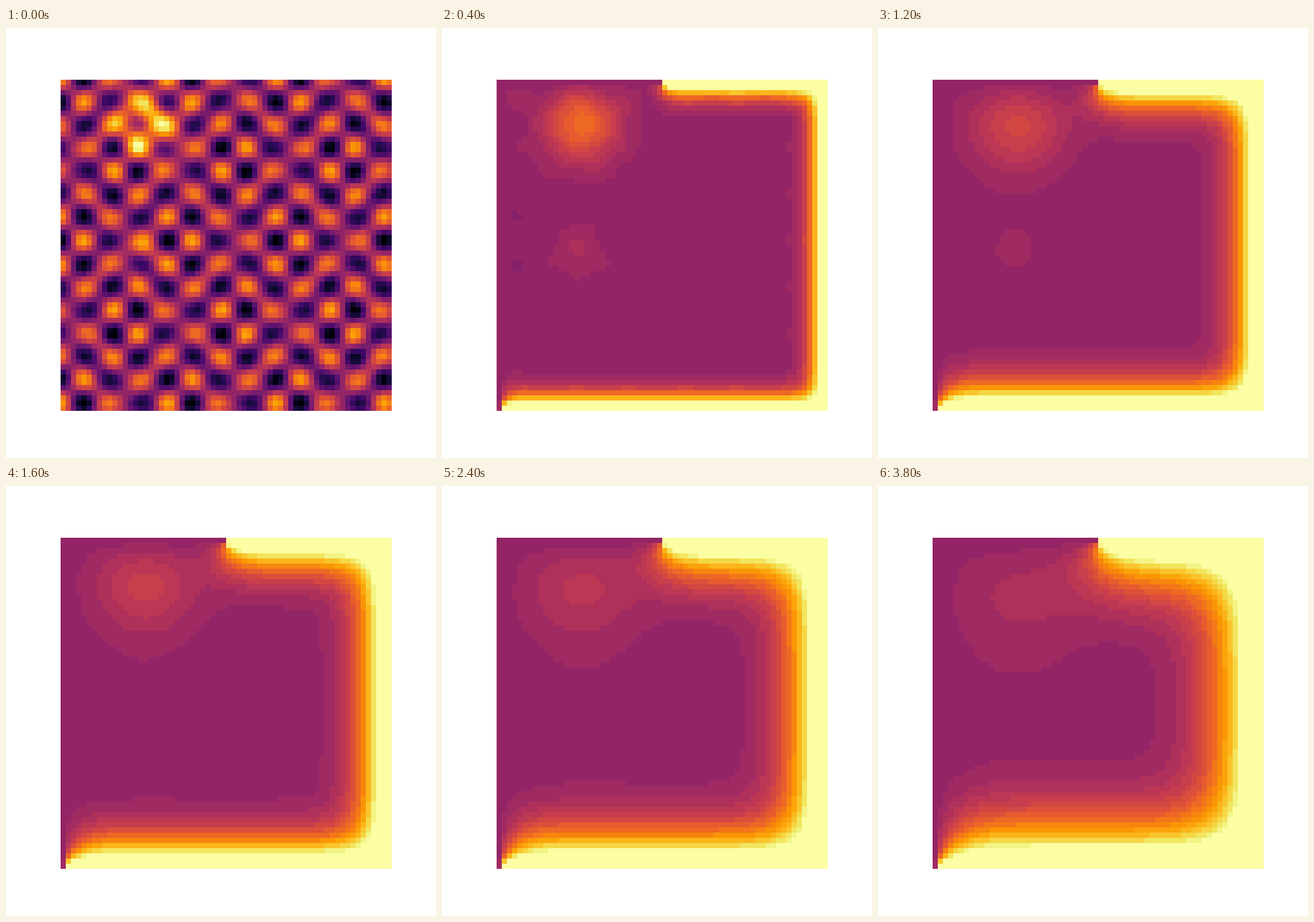
A matplotlib script for the animation above (4000 ms loop, 748 by 748 pixels).

```python
import numpy as np
import matplotlib.pyplot as plt
from matplotlib.animation import FuncAnimation

N = 64
FRAMES = 20
SUBSTEPS = 10
DT = 0.2          # diffusivity * time step, in cells squared
HOT = 2.2         # temperature of the heated walls

y, x = np.mgrid[:N, :N].astype(float)


def spot(cx, cy, amp, var):
    return amp * np.exp(-((x - cx) ** 2 + (y - cy) ** 2) / (2 * var))


def initial():
    u, v = x - 1.6, y - 30.6
    waves = (0.83 * np.sin(0.6 * u) * np.cos(0.7 * v)
             + 0.22 * np.sin(0.9 * u) * np.cos(0.5 * v))
    return waves + spot(16, 8, 1.0, 17) + spot(15.4, 32.4, 0.42, 4)


def set_walls(t):
    t[0, :N // 2] = 0
    t[0, N // 2:] = HOT
    t[-1, :] = HOT
    t[:, -1] = HOT
    t[:, 0] = 0
    t[-2:, 0] = 0.07


def diffuse(t):
    t = t.copy()
    for _ in range(SUBSTEPS):
        set_walls(t)
        lap = (t[2:, 1:-1] + t[:-2, 1:-1] + t[1:-1, 2:] + t[1:-1, :-2]
               - 4 * t[1:-1, 1:-1])
        t[1:-1, 1:-1] += DT * lap
    return t


history = [initial()]
while len(history) < FRAMES:
    history.append(diffuse(history[-1]))

fig, ax = plt.subplots(figsize=(7.48, 7.48), dpi=100)
ax.axis("off")
image = ax.imshow(history[0], cmap=plt.get_cmap("inferno", 31),
                  vmin=-1, vmax=1.5, interpolation="nearest")


def draw(i):
    image.set_data(history[i])
    return (image,)


anim = FuncAnimation(fig, draw, frames=FRAMES, interval=200,
                     repeat=True, repeat_delay=0)
plt.show()
```
